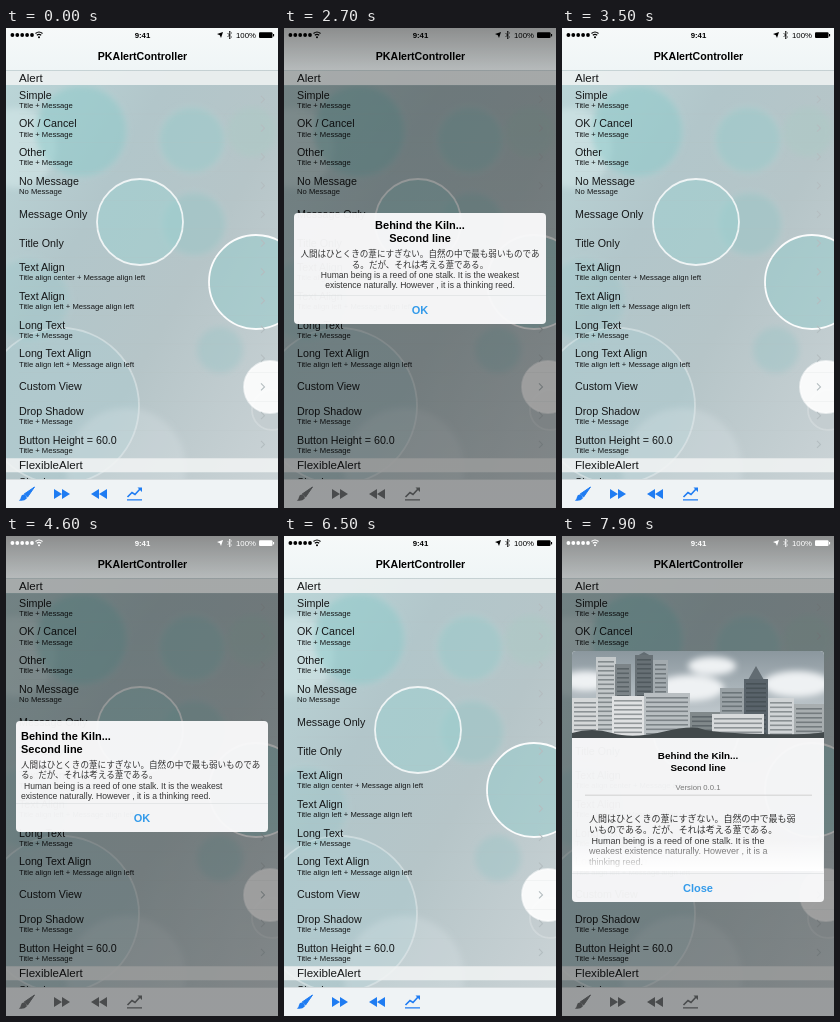
Recreate the animation shown at these times as an HTML page. Size 272 by 480 pixels, loop 8000 ms.

```html
<!DOCTYPE html>
<html lang="en">
<head>
<meta charset="utf-8">
<title>Alert controller demo</title>
<style>
  html, body { margin: 0; width: 100%; height: 100%; overflow: hidden; background: #c6d4d6; }
  svg { display: block; width: 100vw; height: 100vh; }
  text { font-family: "Liberation Sans", Arial, "Noto Sans CJK JP", "Noto Sans CJK", sans-serif; white-space: pre; }
  .b { font-weight: bold; }
</style>
</head>
<body>
<svg id="stage" viewBox="0 0 272 480" xmlns="http://www.w3.org/2000/svg">
  <defs>
    <linearGradient id="base" x1="0" y1="0" x2="1" y2="1">
      <stop offset="0" stop-color="#bcd8da"/>
      <stop offset=".35" stop-color="#b2c6ca"/>
      <stop offset=".6" stop-color="#b6c5c8"/>
      <stop offset="1" stop-color="#ccd4d7"/>
    </linearGradient>
    <linearGradient id="nav" x1="0" y1="0" x2="0" y2="1">
      <stop offset="0" stop-color="#f6f9f9"/>
      <stop offset="1" stop-color="#eff5f6"/>
    </linearGradient>
    <linearGradient id="shade" gradientUnits="userSpaceOnUse" x1="0" y1="0" x2="0" y2="480">
      <stop offset="0" stop-color="#000" stop-opacity=".43"/>
      <stop offset=".088" stop-color="#000" stop-opacity=".24"/>
      <stop offset=".09" stop-color="#000" stop-opacity=".29"/>
      <stop offset=".119" stop-color="#000" stop-opacity=".29"/>
      <stop offset=".12" stop-color="#000" stop-opacity=".39"/>
      <stop offset="1" stop-color="#000" stop-opacity=".36"/>
    </linearGradient>
    <linearGradient id="sky" x1="0" y1="0" x2="0" y2="1">
      <stop offset="0" stop-color="#8b979e"/>
      <stop offset="1" stop-color="#d3dade"/>
    </linearGradient>
    <linearGradient id="fade" x1="0" y1="0" x2="0" y2="1">
      <stop offset="0" stop-color="#fff" stop-opacity="0"/>
      <stop offset="1" stop-color="#fff"/>
    </linearGradient>
    <filter id="soft"><feGaussianBlur stdDeviation="3"/></filter>
    <filter id="edge"><feGaussianBlur stdDeviation=".6"/></filter>
    <clipPath id="list"><rect y="42" width="272" height="409"/></clipPath>
    <clipPath id="card"><rect x="10" y="115" width="252" height="251" rx="4"/></clipPath>
  </defs>
  <rect width="272" height="480" fill="url(#base)"/>
  <g id="bokeh"></g>
  <rect id="press" width="272" height="28.75" fill="#d9d9d9"/>
  <g id="rows" clip-path="url(#list)" fill="#151718"></g>
  <g id="bars"></g>
  <rect id="dim" width="272" height="480" fill="url(#shade)"/>
  <g id="status"></g>
  <g id="alerts"></g>
</svg>
<script>
const $ = id => document.getElementById(id);
const ROW = 28.75, TOP = 57, LOOP = 8000;

const text = (x, y, size, str, more = '') =>
  `<text x="${x}" y="${y}" font-size="${size}" ${more}>${str}</text>`;
const rect = (x, y, w, h, fill, more = '') =>
  `<rect x="${x}" y="${y}" width="${w}" height="${h}" fill="${fill}" ${more}/>`;
const mid = 'text-anchor="middle"';

// Background lights: x, y, radius, fill, fill opacity, rim opacity
const lights = [
  [10, 120, 40, '#e2f2f2', .4, 0], [75, 103, 46, '#8ccaca', .5, .1],
  [186, 112, 33, '#96cdc9', .45, .1], [246, 104, 25, '#a8cac4', .4, 0],
  [188, 196, 32, '#96c6c6', .45, .1], [134, 194, 43, '#9dd2d2', .5, .8],
  [250, 254, 47, '#93cbcb', .5, .95], [214, 322, 23, '#97c4c5', .4, 0],
  [55, 378, 78, '#a9cfd4', .35, .35], [22, 272, 42, '#94c8cb', .3, .1],
  [120, 440, 60, '#e4ecee', .25, 0], [266, 382, 20, '#c3cccf', .7, .2],
  [264, 359, 26, '#ffffff', .9, .6]
];
$('bokeh').innerHTML = lights.map(([x, y, r, fill, a, rim]) =>
  `<circle cx="${x}" cy="${y}" r="${r}" fill="${fill}" fill-opacity="${a}" stroke="#fff"
    stroke-opacity="${rim}" stroke-width="1.8" filter="url(#${rim < .15 ? 'soft' : 'edge'})"/>`).join('');

const plain = 'Title + Message';
const items = [
  ['Simple', plain], ['OK / Cancel', plain], ['Other', plain], ['No Message', 'No Message'],
  ['Message Only'], ['Title Only'],
  ['Text Align', 'Title align center + Message align left'],
  ['Text Align', 'Title align left + Message align left'],
  ['Long Text', plain], ['Long Text Align', 'Title align left + Message align left'],
  ['Custom View'], ['Drop Shadow', plain], ['Button Height = 60.0', plain]
];

function row([title, sub], i) {
  const c = TOP + (i + .5) * ROW;
  return text(13, c + (sub ? -.8 : 3.6), 10.7, title) +
    (sub ? text(13, c + 8.4, 7.65, sub) : '') +
    `<path d="M255 ${c - 3.5}l3.5 3.5l-3.5 3.5" fill="none" stroke="#b4bdc0" stroke-width="1.1"/>` +
    rect(13, c + ROW / 2, 259, .4, '#aebbbe', 'opacity=".3"');
}
const header = (y, title) =>
  rect(0, y, 272, 14, '#f1f4f4', 'opacity=".86"') + text(13, y + 11, 11.6, title);

const listEnd = TOP + items.length * ROW;
$('rows').innerHTML = items.map(row).join('') + header(43, 'Alert') +
  header(listEnd - .5, 'FlexibleAlert') + text(13, listEnd + 27, 10.7, 'Simple');

$('bars').innerHTML = rect(0, 0, 272, 42.5, 'url(#nav)') + rect(0, 42.3, 272, .5, '#b9c3c5') +
  text(136.5, 31.5, 10.6, 'PKAlertController', `class="b" ${mid}`) +
  rect(0, 451, 272, 29, '#eff3f5') + rect(0, 451, 272, .5, '#b9c3c5') +
  `<g id="tools">
    <path d="M28.5 459L21.6 469L18.2 466Z" stroke="currentColor"/>
    <path d="M17.4 466.4q3.4 .8 3.4 4q-3 3.4-8 2q2-.8 2-3q.6-2.8 2.6-3z"/>
    <path d="M48 461l8 5l-8 5zM56 461l8 5l-8 5z"/>
    <path d="M101 461l-8 5l8 5zM93 461l-8 5l8 5z"/>
    <path d="M121 471.3h15v1.3h-15zM131.5 459.5h4.5v4.5z"/>
    <path d="M121.5 469l4.5-4.5l3 2l5-5.5" style="fill:none" stroke="currentColor" stroke-width="1.6"/>
  </g>`;

$('status').innerHTML =
  [0, 1, 2, 3, 4].map(i => `<circle cx="${6.4 + i * 4.9}" cy="7" r="1.9"/>`).join('') +
  `<path d="M29.5 5.5q3.5-3 7 0M30.8 7.3q2.2-1.8 4.4 0" fill="none" stroke="currentColor" stroke-width="1.1"/>
   <circle cx="33" cy="9.2" r="1"/>
   <path d="M217 4l-2 6l-1.2-2.8l-2.8-1.2z"/>
   <path d="M221.5 5l4 4l-2 2v-8l2 2l-4 4" fill="none" stroke="currentColor" stroke-width=".7"/>` +
  text(136.5, 10, 7.8, '9:41', `class="b" ${mid}`) + text(230, 10, 7.8, '100%') +
  rect(253, 4.3, 13.5, 5.8, 'currentColor', 'rx="1"') + rect(267, 6, 1.1, 2.4, 'currentColor');

const heading = ['Behind the Kiln...', 'Second line'];
const message = [
  '人間はひとくきの葦にすぎない。自然の中で最も弱いものであ', 'る。だが、それは考える葦である。',
  'Human being is a reed of one stalk. It is the weakest',
  'existence naturally. However , it is a thinking reed.'
];
const longMessage = [
  '人間はひとくきの葦にすぎない。自然の中で最も弱', 'いものである。だが、それは考える葦である。',
  ' Human being is a reed of one stalk. It is the',
  'weakest existence naturally. However , it is a', 'thinking reed.'
];

const INK = 'fill="#333"';
const button = (y, label) =>
  rect(10, y - 15, 252, .5, '#d3d6d8') +
  text(136, y + 4, 11, label, `class="b" fill="#349bea" ${mid}`);
const frame = (y, h) => rect(10, y, 252, h, '#fbfbfc', 'rx="4" opacity=".95"');

function simpleAlert(left) {
  const x = left ? 15 : 136, anchor = left ? '' : mid;
  return frame(185, 111) + '<g class="body slide">' +
    heading.map((s, i) => text(x, 201 + i * 13, 11, s, `class="b" ${anchor}`)).join('') +
    message.map((s, i) =>
      text(x + (left && i === 2 ? 3 : 0), 229.2 + i * 10.4, 8.57, s, `${INK} ${anchor}`)).join('') +
    '</g>' + button(282, 'OK');
}

// Skyline blocks, back to front: x, top, width, tone
const towers = [
  [34, 121, 20, '#c4c9cb'], [53, 128, 16, '#7c8488'], [73, 119, 18, '#687176'],
  [91, 124, 15, '#a3abaf'], [182, 143, 24, '#59636a'], [158, 152, 24, '#99a1a5'],
  [10, 162, 26, '#d5d8d9'], [50, 160, 32, '#dfe1e2'], [82, 157, 46, '#b9bfc2'],
  [128, 176, 30, '#81898b'], [206, 162, 26, '#d0d4d6'], [232, 168, 30, '#a8aeb0'],
  [150, 178, 52, '#d7dadb']
];
function skyline() {
  const clouds = [[24, 145, 26], [128, 152, 34], [235, 148, 34], [150, 130, 24]]
    .map(([x, y, r]) => `<ellipse cx="${x}" cy="${y}" rx="${r}" ry="${r / 2.6}" fill="#eef1f3"/>`).join('');
  const blocks = towers.map(([x, y, w, tone]) => {
    let s = rect(x, y, w, 202 - y, tone);
    for (let k = y + 4; k < 200; k += 4.5) s += rect(x + 2, k, w - 4, 1.6, '#343c41', 'opacity=".45"');
    return s;
  }).join('');
  return `<g clip-path="url(#card)">${rect(10, 115, 252, 87, 'url(#sky)')}
    <g filter="url(#soft)">${clouds}</g>
    <path d="M75 120l7-4l7 4zM186 144l8-14l8 14z" fill="#626c72"/>${blocks}
    <path d="M10 197q20-6 40 0t50-1t40-3t60 5t62-2v6h-252z" fill="#42494b"/></g>`;
}
function customAlert() {
  return frame(115, 251) + `<g class="body">${skyline()}<g class="slide">` +
    heading.map((s, i) => text(136, 222.6 + i * 11.8, 9.85, s, `class="b" ${mid}`)).join('') +
    text(136, 253, 7.7, 'Version 0.0.1', `fill="#777" ${mid}`) +
    rect(23, 258, 227, .6, '#b8b8b8') +
    longMessage.map((s, i) => text(27, 285.4 + i * 10.7, 9, s, INK)).join('') +
    '</g>' + rect(11, 304, 250, 31, 'url(#fade)') + '</g>' + button(352, 'Close');
}

const shows = [
  { start: 400, end: 2700, row: 0, art: simpleAlert(false) },
  { start: 3500, end: 5800, row: 7, art: simpleAlert(true) },
  { start: 6700, end: Infinity, row: 10, art: customAlert() }
];
$('alerts').innerHTML = shows.map(s => `<g>${s.art}</g>`).join('');
shows.forEach((s, i) => {
  s.node = $('alerts').children[i];
  s.body = s.node.querySelector('.body');
  s.slide = s.node.querySelector('.slide');
});

const clamp = v => Math.min(1, Math.max(0, v));
const ease = v => { v = clamp(v); return v * v * (3 - 2 * v); };
const OPEN = 380;

function draw(t) {
  let dim = 0, press = 0, tinted = false, light = false;
  for (const s of shows) {
    const age = t - s.start;
    const shown = ease((age - OPEN) / 420);
    const alpha = shown * (1 - ease((t - s.end) / 450));
    s.node.style.display = alpha > 0 ? '' : 'none';
    if (age >= 100 && age < 800) {
      press = .6 * (1 - ease((age - OPEN) / 420));
      $('press').setAttribute('y', TOP + s.row * ROW);
    }
    if (alpha <= 0) continue;
    dim = alpha;
    tinted = true;
    light = t < s.end;
    // The card shrinks into place, then its content rises in.
    const k = 1 + .135 * (1 - shown);
    const p = clamp((age - 750) / 650);
    s.node.setAttribute('opacity', alpha);
    s.node.setAttribute('transform', `translate(136 240.5) scale(${k}) translate(-136 -240.5)`);
    s.body.setAttribute('opacity', Math.min(1, p * 2.5));
    s.slide.setAttribute('transform', `translate(0 ${28 * (1 - p) ** 3})`);
  }
  $('dim').setAttribute('opacity', dim);
  $('press').setAttribute('opacity', press);
  paint($('tools'), tinted ? '#737678' : '#1f7cf2');
  paint($('status'), light ? '#fff' : '#000');
}
function paint(node, color) {
  node.style.color = color;
  node.style.fill = color;
}

const began = performance.now();
function tick() {
  draw((performance.now() - began) % LOOP);
  requestAnimationFrame(tick);
}
tick();
</script>
</body>
</html>
```
